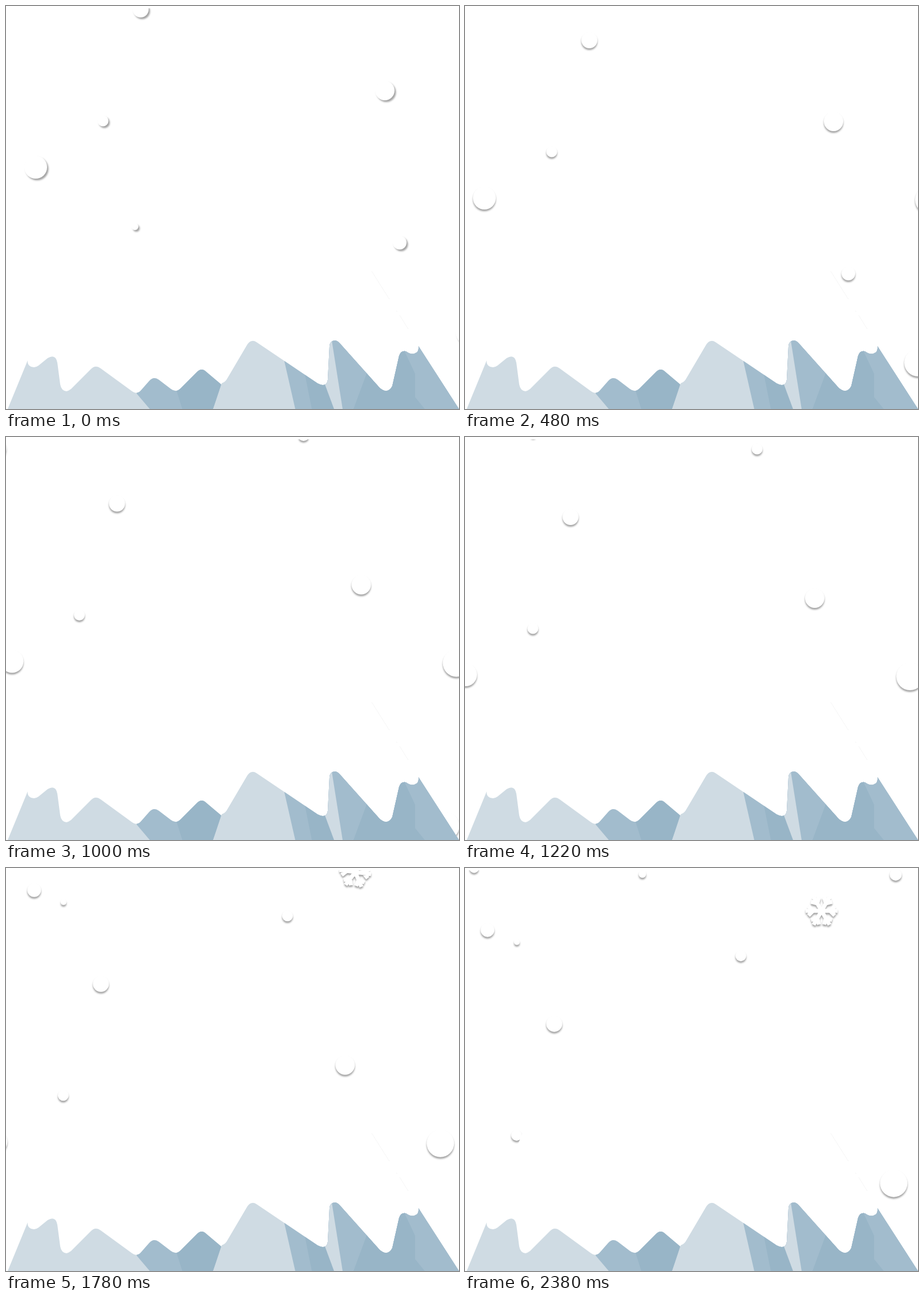
An HTML page with a canvas that plays this animation: 794x705 px, repeating every 2.4 s.

```html
<!DOCTYPE html>
<html lang="en">
<head>
<meta charset="utf-8">
<title>Snowfall</title>
<style>
html, body { margin: 0; width: 100%; height: 100%; overflow: hidden; background: #fff; }
canvas { display: block; }
</style>
</head>
<body>
<canvas id="stage" width="794" height="705"></canvas>
<script>
const W = 794, H = 705, LOOP = 2400;
const ctx = document.getElementById('stage').getContext('2d');
const LIGHT = '#cfdbe3', MID = '#a2bccd', DARK = '#98b5c7';

// Start position and radius of each snowball
const balls = [
  [236, 6, 14], [664, 148, 17], [52, 282, 20], [170, 201, 9.5], [226, 386, 6],
  [690, 414, 12], [831, 285, 24], [812, 570, 24], [22, -90, 20], [563, -113, 9.5],
  [170.5, -137, 5], [119, -158, 12], [95.5, -266, 8], [390.5, -256, 6.5], [834.5, -255, 10.5]
];

// Shared wind drift: time, dx, dy
const drift = [
  [0, 0, 0], [480, -18, 54], [760, -30.5, 85], [1220, -51, 134],
  [1540, -63, 170], [2020, -75, 224], [2400, -79.8, 269]
];

function slope(i, axis) {
  const a = drift[Math.max(0, i - 1)], b = drift[Math.min(drift.length - 1, i + 1)];
  return (b[axis] - a[axis]) / (b[0] - a[0]);
}

function driftAt(t, axis) {
  let i = 0;
  while (i < drift.length - 2 && t >= drift[i + 1][0]) i++;
  const a = drift[i], b = drift[i + 1], span = b[0] - a[0];
  const u = (t - a[0]) / span, v = 1 - u;
  return a[axis] * (1 + 2 * u) * v * v + slope(i, axis) * span * u * v * v
       + b[axis] * (3 - 2 * u) * u * u - slope(i + 1, axis) * span * u * u * v;
}

const snowCaps = new Path2D('M3 705 L155 330 L467 705Z M363 705 L520 275 L794 705Z');
const leftRock = new Path2D(
  'M3 705 L38 620 Q37 631 49 632 Q53 632 57 629 L73 616 Q87 608 90 624 L95 662 ' +
  'Q97 673 106 674 Q110 673 114 670 L149 635 Q157 627 166 634 L221 674 Q229 680 236 673 ' +
  'L251 656 Q259 647 268 654 L289 670 Q298 677 306 669 L335 640 Q343 632 351 640 ' +
  'L370 656 Q375 660 378 663 L363 705Z');
const rightRock = new Path2D(
  'M363 705 L378 660 Q384 658 387 653 L423 592 Q430 582 439 588 L546 660 ' +
  'Q562 668 564 654 L567 595 Q568 585 577 585 Q582 586 586 591 L655 668 ' +
  'Q669 680 677 665 L689 612 Q692 602 701 604 Q709 610 716 608 Q724 606 723 595 L794 705Z');

const leftFaces = [
  [MID, 'M229 678 L252 705 H400 V560 H229Z'],
  [DARK, 'M299 673 L309 705 H400 V560 H299Z']
];
const rightFaces = [
  [MID, 'M488 622 L507 705 H800 V560 H488Z'],
  [DARK, 'M524 645 L536 705 H800 V560 H524Z'],
  [LIGHT, 'M559 662 L575 705 H800 V560 H559Z'],
  [MID, 'M571 585 L590 705 H800 V560 H571Z'],
  [DARK, 'M632 643 L609 705 H734 L717 684 V643 L699 605 V560 H632Z']
];

function drawRock(shape, faces) {
  ctx.save();
  ctx.fillStyle = LIGHT;
  ctx.fill(shape);
  ctx.clip(shape);
  for (const [color, d] of faces) {
    ctx.fillStyle = color;
    ctx.fill(new Path2D(d));
  }
  ctx.restore();
}

function drawMountains() {
  ctx.fillStyle = '#fff';
  ctx.fill(snowCaps);
  ctx.strokeStyle = '#f3f3f3';
  ctx.lineWidth = 0.8;
  ctx.stroke(new Path2D('M641 464 L672 513 M684 533 L686 535 M690 541 L705 565'));
  drawRock(leftRock, leftFaces);
  drawRock(rightRock, rightFaces);
}

function drawCrystal(t) {
  const dt = t - 1540;
  ctx.save();
  ctx.translate(607 + dt * 0.0214, -20 + dt * 0.113);
  ctx.rotate(0.16 * Math.sin(dt / 840 * Math.PI));
  ctx.strokeStyle = '#fff';
  ctx.lineWidth = 7;
  ctx.beginPath();
  for (let i = 0; i < 6; i++) {
    ctx.moveTo(0, 0);
    ctx.lineTo(28, 0);
    ctx.moveTo(23, -8);
    ctx.lineTo(15, 0);
    ctx.lineTo(23, 8);
    ctx.rotate(Math.PI / 3);
  }
  ctx.stroke();
  ctx.restore();
}

function drawSnow(t) {
  const dx = driftAt(t, 1), dy = driftAt(t, 2);
  ctx.save();
  ctx.beginPath();
  ctx.rect(0, 4, W, H);
  ctx.clip();
  ctx.shadowColor = '#a4a4a4';
  ctx.shadowBlur = 3;
  ctx.shadowOffsetX = 2.5 * Math.max(0, 1 - t / 400);
  ctx.shadowOffsetY = 3;
  ctx.fillStyle = '#fff';
  for (const [x, y, r] of balls) {
    ctx.beginPath();
    ctx.arc(x + dx, y + dy, r, 0, Math.PI * 2);
    ctx.fill();
  }
  drawCrystal(t);
  ctx.restore();
}

function frame() {
  const t = Math.floor(performance.now() % LOOP / 20) * 20;
  ctx.fillStyle = '#fff';
  ctx.fillRect(0, 0, W, H);
  drawSnow(t);
  drawMountains();
  requestAnimationFrame(frame);
}
frame();
</script>
</body>
</html>
```
